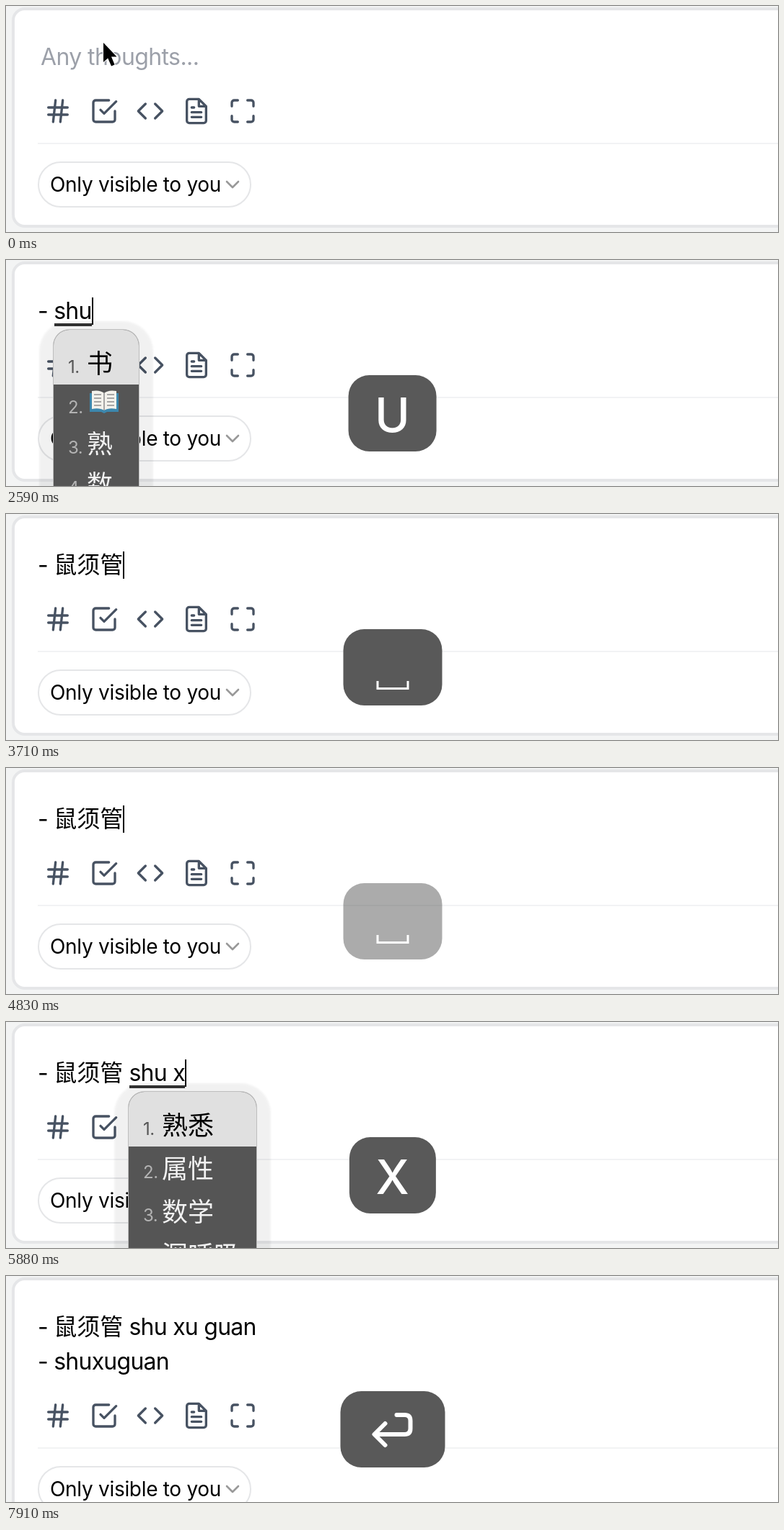
Animation, 1070 px wide and 314 px high, one loop 8 s. Source, as an HTML page:

```html
<!DOCTYPE html>
<html lang="zh-Hans">
<head>
<meta charset="utf-8">
<title>Memo editor with input method</title>
<style>
html, body { margin: 0; width: 100%; height: 100%; overflow: hidden; }
body { font-family: Inter, "Noto Sans CJK SC", "Noto Sans CJK", sans-serif; }
#stage { position: relative; width: 1070px; height: 314px; overflow: hidden; background: #f3f4f4; }
#stage div, #stage > svg { position: absolute; }
#card { left: 8px; top: 2px; width: 1100px; height: 298px; border: 4px solid #e5e6e8; border-radius: 18px; background: #fff; }
.line { left: 44px; height: 48px; font-size: 32px; line-height: 48px; letter-spacing: -.76px; white-space: pre; color: #000; }
#line1 { top: 47px; }
#line2 { top: 95px; }
#hint { left: 48px; top: 47px; letter-spacing: -.6px; }
.han { letter-spacing: 0; }
.comp { position: relative; }
.comp::after { content: ""; position: absolute; left: 1px; right: 0; bottom: -2px; height: 4px; background: #333; }
.caret { position: relative; }
.caret::after { content: ""; position: absolute; left: 0; bottom: 0; width: 2px; height: 38px; background: #000; }
.blink .caret::after { visibility: hidden; }
#tools { left: 0; top: 0; width: 1070px; height: 314px; }
#tools svg { position: absolute; left: 0; top: 0; overflow: visible; fill: none; stroke-linecap: round; stroke-linejoin: round; }
#rule { left: 44px; top: 190px; width: 1026px; height: 2px; background: #f2f3f4; }
#pill { left: 44px; top: 216px; width: 292px; height: 60px; border: 2px solid #e5e6e8; border-radius: 32px; }
#scope { left: 61px; top: 228px; font-size: 28px; line-height: 40px; letter-spacing: -.3px; white-space: pre; }
#badge { left: 44px; top: -14px; width: 292px; height: 48px; border-radius: 7px; background: #933fd5; color: #fff; }
#badge b { position: absolute; left: 9px; top: 8px; width: 31px; height: 31px; border-radius: 4px; background: #fff; }
#badge span { position: absolute; left: 49px; font-size: 26px; font-weight: 500; line-height: 48px; letter-spacing: -.45px; white-space: pre; }
#popup { top: 97px; height: 320px; border-radius: 22px; background: #555; box-shadow: 0 0 0 1px #bdbdbd, 0 8px 3px 20px rgba(0,0,0,.055); }
#lit { left: 0; top: 0; width: 100%; height: 76px; border-radius: 22px 22px 0 0; background: #e0e0e0; }
.row { left: 20px; font-size: 36px; height: 60px; line-height: 60px; white-space: pre; color: #f2f2f2; }
.row i { display: inline-block; width: 26px; font-size: 24px; line-height: 1; font-style: normal; letter-spacing: -.5px; color: #b4b4b4; }
.row.first { color: #000; }
.row.first i { color: #555; }
.row svg { margin-left: 4px; }
#key { left: 535.5px; top: 160px; height: 106px; padding: 0 37px; transform: translateX(-50%); box-sizing: border-box; border-radius: 29px; background: #595959; color: #fff; font-size: 66px; font-weight: 500; line-height: 110px; }
#key svg { display: block; fill: none; stroke: #fff; }
</style>
</head>
<body>
<div id="stage">
  <div id="card"></div>
  <div id="hint" class="line">Any thoughts...</div>
  <div id="line1" class="line"></div>
  <div id="line2" class="line"></div>
  <div id="tools">
    <svg id="icons" width="1070" height="314" stroke="#475262"></svg>
    <div id="rule"></div>
    <div id="pill"></div>
    <div id="scope">Only visible to you</div>
    <svg width="1070" height="314" stroke="#999" stroke-width="2.6"><path d="M306 244l8 8 8-8"/></svg>
  </div>
  <div id="badge"><b></b><span>Squirrel - Simplified</span></div>
  <div id="popup"></div>
  <div id="key"></div>
  <svg id="arrow" width="180" height="100"><path d="M135 51V78L141.2 72.5 146 83.5 150.6 81.5 146 70.6H153.500Z" fill="#000" stroke="#fff" stroke-width="2" paint-order="stroke"/></svg>
  <svg id="beam" width="180" height="100" fill="none" stroke-linecap="round">
    <path id="beamShape" d="M133 38.500Q139 38.500 139 43V62Q139 67 133 67M145 38.500Q139 38.500 139 43M139 62Q139 67 145 67M136 55H142" stroke="#fff" stroke-width="4"/>
    <use href="#beamShape" style="stroke:#000"/>
  </svg>
</div>
<script>
const LOOP = 8000;
const $ = id => document.getElementById(id);

const ICONS = [
  'M4 9H20M4 15H20M10 3L8 21M16 3L14 21',
  'M9 11l3 3L22 4M21 12v7a2 2 0 0 1-2 2H5a2 2 0 0 1-2-2V5a2 2 0 0 1 2-2h11',
  'M16 18l6-6-6-6M8 6l-6 6 6 6',
  'M14 2H6a2 2 0 0 0-2 2v16a2 2 0 0 0 2 2h12a2 2 0 0 0 2-2V8zM14 2v6h6M16 13H8M16 17H8M10 9H8',
  'M8 3H5a2 2 0 0 0-2 2v3M21 8V5a2 2 0 0 0-2-2h-3M16 21h3a2 2 0 0 0 2-2v-3M3 16v3a2 2 0 0 0 2 2h3'
];
$('icons').innerHTML = ICONS.map((d, i) =>
  `<path d="${d}" transform="translate(${52 + 64 * i} 126) scale(1.6667)" stroke-width="2"/>`).join('');

const BOOK = `<svg width="40" height="32"><path d="M0 4H40V30H24L20 32 16 30H0Z" fill="#3c87ad"/>
<path d="M3 1Q14 -1 20 4Q26 -1 37 1V26Q26 24 20 28Q14 24 3 26Z" fill="#f4f2ec"/>
<path d="M20 4V28M6 6H16M6 11H16M6 16H16M6 21H16M24 6H34M24 11H34M24 16H34M24 21H34" stroke="#8d8d8d" stroke-width="1.5"/></svg>`;

// Candidates offered for each composed text
const LISTS = {
  's': ['是', '说', '上', '时'],
  'sh': ['是', '上', '时', '说'],
  'shu': ['书', BOOK, '熟', '数'],
  'shu x': ['熟悉', '属性', '数学', '深呼吸'],
  'shu xu': ['书序', '数序', '书', '树'],
  'shu xu g': ['鼠须管', '书序', '书', '熟']
};
const candidates = comp => LISTS[comp] || LISTS['shu xu g'];

const GLYPHS = {
  space: '<svg width="63" height="106"><path d="M10.500 72V82.500H52.500V72" stroke-width="3"/></svg>',
  enter: `<svg width="71" height="106" stroke-linecap="round" stroke-linejoin="round">
    <path d="M41 33H52Q60 33 60 41V52Q60 60 52 60H11M25 45L10 60L25 75" stroke-width="6"/></svg>`
};

// [time, committed text, composed text, key shown, second line]
const DASH = '- ', HAN = '- 鼠须管', SPACED = HAN + ' ';
const STEPS = [
  [0, '', '', ''],
  [1610, '-', '', '-'],
  [2030, DASH, '', 'space'],
  [2450, DASH, 's', 'S'],
  [2520, DASH, 'sh', 'H'],
  [2590, DASH, 'shu', 'U'],
  [2730, DASH, 'shu x', 'X'],
  [2800, DASH, 'shu xu', 'U'],
  [3010, DASH, 'shu xu g', 'G'],
  [3080, DASH, 'shu xu gu', 'U'],
  [3150, DASH, 'shu xu gua', 'A'],
  [3220, DASH, 'shu xu guan', 'N'],
  [3710, HAN, '', 'space'],
  [5110, SPACED, '', 'space'],
  [5460, SPACED, '', 'S'],
  [5530, SPACED, 's', 'S'],
  [5600, SPACED, 's', 'H'],
  [5670, SPACED, 'sh', 'H'],
  [5740, SPACED, 'shu', 'U'],
  [5880, SPACED, 'shu x', 'X'],
  [5950, SPACED, 'shu xu', 'U'],
  [6230, SPACED, 'shu xu g', 'G'],
  [6300, SPACED, 'shu xu gu', 'U'],
  [6440, SPACED, 'shu xu gua', 'A'],
  [6580, SPACED, 'shu xu guan', 'N'],
  [7350, SPACED + 'shu xu guan', '', 'enter', '- shuxuguan']
];
const CARET_OFF = [[0, 70], [560, 1050], [4200, 4760], [7140, 7350], [7910, 8000]];
const BADGE = [[0, 0], [70, .3], [140, .6], [210, .85], [280, 1], [1050, .8], [1120, .6],
  [1190, .4], [1260, .25], [1330, .12], [1610, 0]];
const KEY_FADE = [[0, 1], [4760, .75], [4830, .5], [4900, .25], [4970, 0], [5110, 1]];

const at = (table, t) => table.findLast(row => row[0] <= t);
const show = (id, on) => { $(id).style.display = on ? '' : 'none'; };
const han = text => text.replace('鼠须管', '<span class="han">$&</span>');
const CARET = '<span class="caret">\u200b</span>';

function drawPopup(comp, left) {
  const list = candidates(comp);
  const pitch = comp === 'shu' ? 56 : 60;
  const box = $('popup');
  box.style.left = left + 'px';
  box.style.width = (comp.length > 3 ? 177 : 118) + 'px';
  box.innerHTML = '<div id="lit"></div>' + list.map((word, i) =>
    `<div class="row${i ? '' : ' first'}" style="top:${17 + i * pitch}px"><i>${i + 1}.</i>${word}</div>`).join('');
}

function drawStep([, text, comp, key, second]) {
  const mark = comp && `<span class="comp">${comp}</span>`;
  $('line1').innerHTML = han(text) + mark + (second ? '' : CARET);
  $('line2').innerHTML = second ? second + CARET : '';
  const grow = second ? 48 : 0;
  $('tools').style.top = grow + 'px';
  $('card').style.height = 298 + grow + 'px';
  show('hint', !text);
  show('popup', comp);
  if (comp) drawPopup(comp, text === DASH ? 66 : 170);
  show('key', key);
  $('key').innerHTML = GLYPHS[key] || key;
}

let current;
function frame(now) {
  const t = now % LOOP;
  const step = at(STEPS, t);
  if (step !== current) drawStep(current = step);
  $('stage').classList.toggle('blink', CARET_OFF.some(([a, b]) => t >= a && t < b));
  $('hint').style.color = t < 70 ? '#9ca0a9' : '#cecece';
  $('badge').style.opacity = at(BADGE, t)[1];
  $('key').style.opacity = at(KEY_FADE, t)[1];
  show('arrow', t < 70);
  show('beam', t >= 70 && t < 1610);
}

const start = performance.now();
(function tick() {
  frame(performance.now() - start);
  requestAnimationFrame(tick);
})();
</script>
</body>
</html>
```
